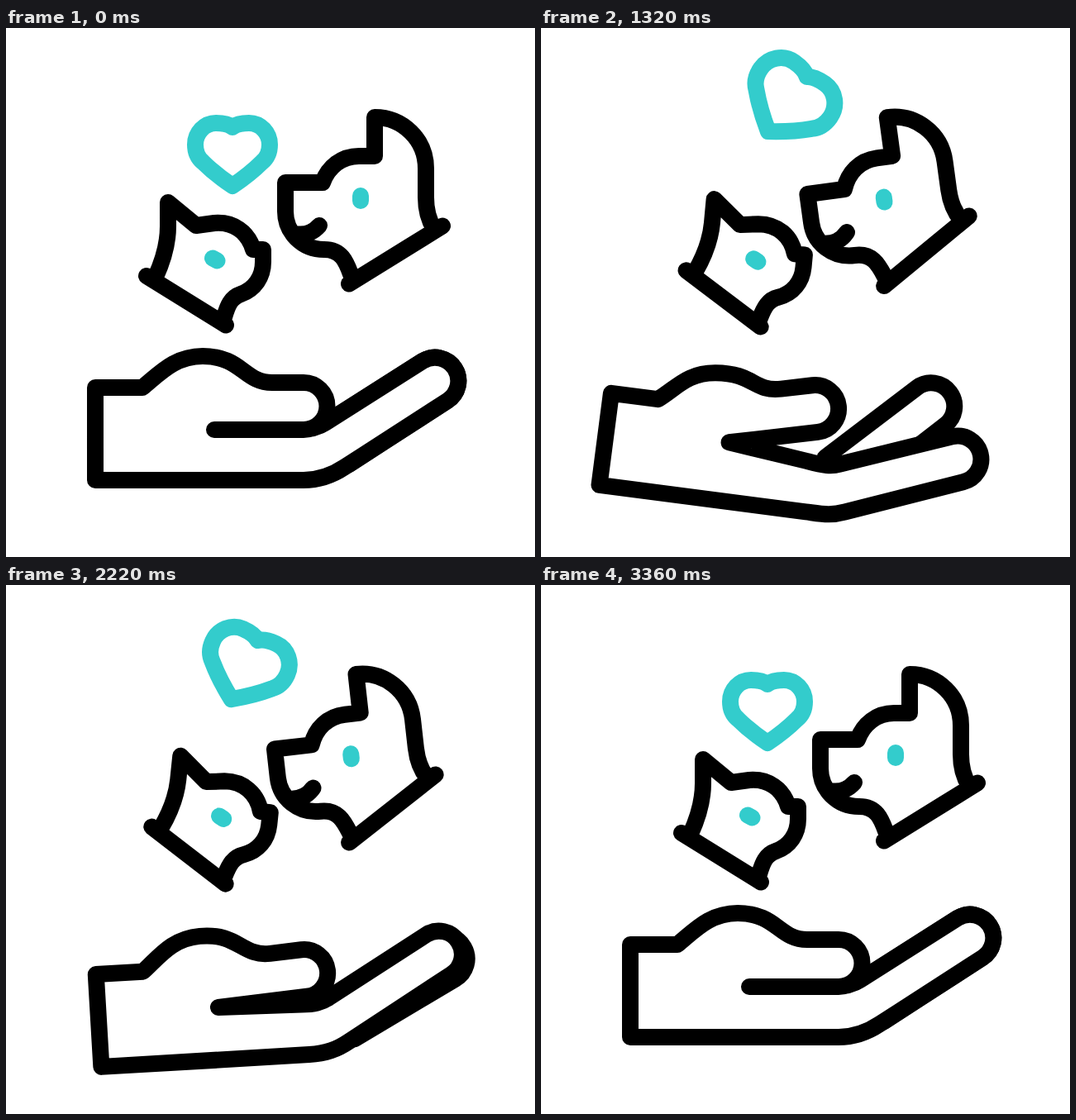
These frames come from a looping animation (640 px wide and 640 px high, 3600 ms). An HTML page:

```html
<!DOCTYPE html>
<html lang="en">
<head>
<meta charset="utf-8">
<title>Pet care</title>
<style>
  html, body { margin: 0; width: 100%; height: 100%; overflow: hidden; background: #fff; }
  svg { display: block; width: 100vw; height: 100vh; }
  path { fill: none; stroke: #000; stroke-width: 20; stroke-linecap: round; stroke-linejoin: round; }
  .teal { stroke: #33cccc; }
  .solid { fill: #fff; }
</style>
</head>
<body>
<svg viewBox="0 0 640 640">
  <path id="finger" class="solid" d="M386 478L504 403A27 27 0 0 1 534 451L415 528"/>
  <path id="hand" class="solid"/>
  <path id="heart" class="teal" d="M0 0C-5 -4 -13 -5 -20 -5C-34 -5 -45 7 -45 21C-45 30 -42 37 -36 42C-25 53 -12 63 0 71C12 63 25 53 36 42C42 37 45 30 45 21C45 7 34 -5 20 -5C13 -5 5 -4 0 0Z"/>
  <g id="cat">
    <path d="M170 300L266 359.5M181 301C192 277 196 255 196 240V211L230 239L252 236C275 234 293 247 299 268H311V283C311 301 301 316 284 322C272 326 268 336 264 350"/>
    <path class="teal" d="M250 278.5L255.5 281.5"/>
  </g>
  <g id="dog">
    <path d="M415 309.5L528 239.5M419 303C413 288 409 268 385 268C358 268 338 247 338 222V187H383C390 168 406 155 427 155H446V108C480 108 508 135 508 170V205C508 219 511 232 518 243M379 239C372 247 362 251 350 249"/>
    <path id="eye" class="teal"/>
  </g>
</svg>
<script>
const LOOP = 3600;
const $ = id => document.getElementById(id);
const place = (id, value) => $(id).setAttribute('transform', value);

const ease = u => {
  u = Math.min(1, Math.max(0, u));
  return u * u * (3 - 2 * u);
};

// Sum of eased moves, each [from ms, to ms, amount].
const moves = (t, ...list) =>
  list.reduce((sum, [from, to, amount]) => sum + amount * ease((t - from) / (to - from)), 0);

// Rocks between +amp and -amp at the given times, from rest to rest.
function rock(t, amp, times) {
  const last = times.length - 1;
  const pose = i => i === 0 || i === last ? 0 : i % 2 ? amp : -amp;
  const i = times.findIndex(end => t < end);
  if (i < 0) return 0;
  return pose(i - 1) + (pose(i) - pose(i - 1)) * ease((t - times[i - 1]) / (times[i] - times[i - 1]));
}

// Turns every "x,y" pair of a path piece about a joint.
function bend(piece, px, py, degrees) {
  const a = degrees * Math.PI / 180, c = Math.cos(a), s = Math.sin(a);
  return piece.replace(/([\d.]+),([\d.]+)/g, (_, x, y) => {
    const dx = x - px, dy = y - py;
    return (px + dx * c - dy * s).toFixed(2) + ',' + (py + dx * s + dy * c).toFixed(2);
  });
}

// Opening swings the thumb up and the front finger down.
function handPath(open) {
  return 'M108,435L165,435C186,418 '
    + bend('204,397 238,397C285,397 ', 212, 460, -7 * open)
    + bend('288,429 322,429L360,429A26 26 0 0 1 360,486L252,486', 212, 460, -14 * open)
    + 'L354,486C'
    + bend('368,486 377,484 386,478L504,403A27 27 0 0 1 534,451L410,531C395,541 ', 357, 520, 11.2 * open)
    + '380,547 360,547L108,547Z';
}

function drawHand(t) {
  const x = moves(t, [260, 740, -32], [1640, 2510, 48], [2480, 2900, -16]);
  const y = moves(t, [0, 680, 35], [2000, 2560, -35]);
  const turn = moves(t, [0, 900, 7.4], [1640, 2510, -14.5], [2490, 2960, 7.1]);
  const open = moves(t, [0, 840, 1], [1780, 2440, -1]);
  const shift = `translate(${x} ${y}) `;
  $('hand').setAttribute('d', handPath(open));
  place('hand', shift + `rotate(${turn} 330 490)`);
  place('finger', shift + `rotate(${-0.65 * turn} 460 604)`);
}

function drawHeart(t) {
  const x = 274 + moves(t, [240, 860, 40], [780, 1980, 18], [2000, 2480, -62], [2480, 2960, 4]);
  const y = 120 + moves(t, [0, 760, -57], [780, 1980, -9.5], [2000, 2760, 66.5]);
  const turn = moves(t, [0, 820, 34], [780, 1980, 3], [2000, 2560, -37]);
  const scale = 1 + 0.004 * turn;
  place('heart', `translate(${x} ${y}) rotate(${turn}) scale(${scale})`);
  $('heart').style.strokeWidth = 20 / scale;
}

function drawPets(t) {
  place('cat', `rotate(${rock(t, -6.1, [0, 600, 1240, 1750, 2260, 2760, 3240])} 245 357)`);
  place('dog', `rotate(${rock(t, 7.8, [0, 840, 1340, 1830, 2310, 2800, 3360])} 434 309.5)`);
  const blink = Math.min(1, Math.abs(t - 860) / 120, Math.abs(t - 2480) / 120);
  const half = 0.01 + 3 * blink;
  $('eye').setAttribute('d', `M429 ${206 - half}V${206 + half}`);
}

function draw(t) {
  drawHand(t);
  drawHeart(t);
  drawPets(t);
}

const start = performance.now();
function tick() {
  draw((performance.now() - start) % LOOP);
  requestAnimationFrame(tick);
}
draw(0);
requestAnimationFrame(tick);
</script>
</body>
</html>
```
